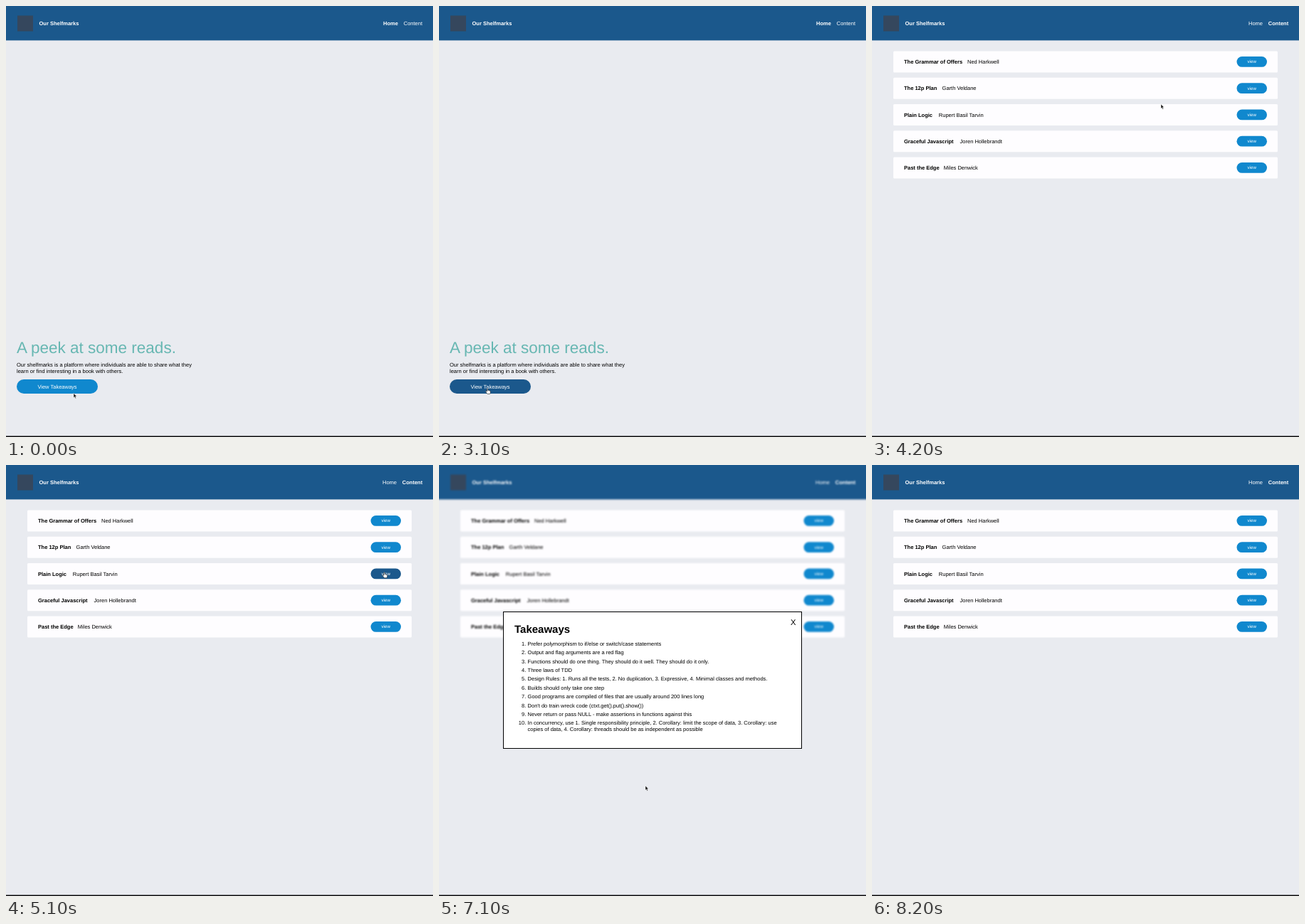
Recreate the animation shown at these times as an HTML page. Size 600 by 606 pixels, loop 9300 ms.

```html
<!DOCTYPE html>
<html lang="en">
<head>
<meta charset="utf-8">
<title>Our Shelfmarks</title>
<style>
  html, body { margin: 0; width: 100%; height: 100%; overflow: hidden; background: #e9ebf0; }
  svg { display: block; width: 100vw; height: 100vh; }
  text {
    font-family: "Liberation Sans", Arial, sans-serif;
    font-size: 7.5px;
    text-rendering: geometricPrecision;
    white-space: pre;
  }
  .bold { font-weight: 700; }
  .light { fill: #fff; }
  .mid { text-anchor: middle; }
  .end { text-anchor: end; }
  .small { font-size: 6.25px; }
</style>
</head>
<body>
<svg id="stage" viewBox="0 0 600 606">
  <rect width="600" height="606" fill="#e9ebf0"/>
  <g id="app">
    <rect x="-10" y="-10" width="620" height="58.4" fill="#1b588c"/>
    <rect x="16" y="13.5" width="22" height="22" fill="#35475d"/>
    <text class="bold light" x="46.5" y="27">Our Shelfmarks</text>
    <g id="home">
      <text class="bold light" x="530" y="27">Home</text>
      <text class="light end" x="585" y="27">Content</text>
      <text x="15" y="488" style="font-size:22.5px" fill="#67b7b2">A peek at some reads.</text>
      <text x="15" y="507.3">Our shelfmarks is a platform where individuals are able to share what they</text>
      <text x="15" y="515.9">learn or find interesting in a book with others.</text>
      <rect id="cta" x="15" y="525" width="114" height="20" rx="10"/>
      <text class="light mid" x="72" y="537.6">View Takeaways</text>
    </g>
    <g id="content">
      <text class="light" x="529" y="27">Home</text>
      <text class="bold light end" x="585.2" y="27">Content</text>
    </g>
  </g>
  <g id="modal">
    <rect x="90.5" y="206.5" width="419" height="192" fill="#fff" stroke="#000"/>
    <text class="bold" x="106" y="235.6" style="font-size:15px">Takeaways</text>
    <text class="mid" x="497.8" y="225" style="font-size:11.25px">X</text>
  </g>
  <rect y="604.5" width="600" height="1.5" fill="#0a0a0c"/>
  <path id="arrow" d="M0 0V6.2L1.4 5L2.4 7.2L3.5 6.7L2.5 4.6H4.4Z"
        fill="#111" stroke="#fff" stroke-width=".5"/>
  <path id="hand" d="M2.1 4.6V1Q2.1 .2 2.7 .2T3.4 1V3.1Q4.2 2.6 4.6 3.2Q5.4 2.8 5.8 3.5Q6.9 3.3 6.9 4.4
        V5.9Q6.8 7 6.1 8H2.8Q1.7 6.7 .4 5Q.1 4.1 1 4Z"
        fill="#fff" stroke="#222" stroke-width=".6"/>
</svg>
<script>
const LOOP = 9300, STEP = 100;
const BLUE = [16, 136, 206], DARK = [27, 88, 140];
const $ = id => document.getElementById(id);

function add(parent, tag, attrs, text = '') {
  const el = document.createElementNS('http://www.w3.org/2000/svg', tag);
  for (const k in attrs) el.setAttribute(k, attrs[k]);
  el.textContent = text;
  return parent.appendChild(el);
}

const books = [
  ['The Grammar of Offers', 'Ned Harkwell', 134],
  ['The 12p Plan', 'Garth Veldane', 98.6],
  ['Plain Logic', 'Rupert Basil Tarvin', 93.8],
  ['Graceful Javascript', 'Joren Hollebrandt', 123.6],
  ['Past the Edge', 'Miles Denwick', 100.8]
];

const viewButtons = books.map(([title, author, x], i) => {
  const card = add($('content'), 'g', { transform: `translate(0 ${63.5 + i * 37.25})` });
  add(card, 'rect', { x: 30, width: 540, height: 30, rx: 1.5, fill: '#fefdff' });
  add(card, 'text', { class: 'bold', x: 45, y: 17.5 }, title);
  add(card, 'text', { x, y: 17.5 }, author);
  const button = add(card, 'rect', { x: 512.5, y: 7.5, width: 42.5, height: 14.8, rx: 7.4 });
  add(card, 'text', { class: 'light mid small', x: 533.7, y: 16.8 }, 'view');
  return button;
});

const notes = [
  'Prefer polymorphism to if/else or switch/case statements',
  'Output and flag arguments are a red flag',
  'Functions should do one thing. They should do it well. They should do it only.',
  'Three laws of TDD',
  'Design Rules: 1. Runs all the tests, 2. No duplication, 3. Expressive, 4. Minimal classes and methods.',
  'Builds should only take one step',
  'Good programs are compiled of files that are usually around 200 lines long',
  "Don't do train wreck code (ctxt.get().put().show())",
  'Never return or pass NULL - make assertions in functions against this',
  'In concurrency, use 1. Single responsibility principle, 2. Corollary: limit the scope of data, 3. Corollary: use\n'
    + 'copies of data, 4. Corollary: threads should be independent as possible'.replace('be independent', 'be as independent')
];

notes.forEach((note, i) => {
  const y = 253.8 + i * 12.4;
  add($('modal'), 'text', { class: 'end', x: 122.3, y }, `${i + 1}.`);
  note.split('\n').forEach((line, j) =>
    add($('modal'), 'text', { x: 124.6, y: y + j * 8.6 }, line));
});

// Pointer tip: time, x, y
const path = [
  [0, 95, 544.5], [600, 95, 544.5], [1600, 107.5, 531.5],
  [1900, 107.5, 531.5], [2700, 68, 537.5],
  [3300, 68, 537.5], [4100, 402, 130], [4300, 410, 146],
  [4400, 410, 146], [4600, 462, 180], [4900, 531, 152],
  [5000, 531, 152], [5100, 531.5, 150.7],
  [6600, 531.5, 150.7], [7100, 290, 451],
  [7900, 290, 451], [8200, 610, 451], [LOOP, 610, 451]
];

const clamp = v => Math.min(1, Math.max(0, v));
const ease = v => v * v * (3 - 2 * v);
const mix = (a, b, k) => a + (b - a) * k;
const shade = k => `rgb(${BLUE.map((c, i) => Math.round(mix(c, DARK[i], k)))})`;
const show = (id, on) => $(id).setAttribute('visibility', on ? 'visible' : 'hidden');

function pointer(t) {
  const i = path.findIndex(p => p[0] > t);
  const [t0, x0, y0] = path[i - 1], [t1, x1, y1] = path[i];
  const k = ease((t - t0) / (t1 - t0));
  return [mix(x0, x1, k), mix(y0, y1, k)];
}

function render(time) {
  const t = Math.floor((time % LOOP) / STEP) * STEP;
  const onHome = t < 3200;
  const open = t >= 5700 && t < 7900;

  show('home', onHome);
  show('content', !onHome);
  show('modal', open);
  $('app').style.filter = open ? 'blur(.9px)' : 'none';

  $('cta').setAttribute('fill', shade(clamp((t - 1600) / 200)));
  viewButtons.forEach((b, i) =>
    b.setAttribute('fill', shade(i === 2 && t >= 4900 && t < 5700 ? 1 : 0)));

  const [x, y] = pointer(t);
  const hand = (t >= 1400 && t < 3500) || (t >= 4900 && t < 5700);
  show('hand', hand);
  show('arrow', !hand);
  $('hand').setAttribute('transform', `translate(${x - 2.7} ${y})`);
  $('arrow').setAttribute('transform', `translate(${x} ${y})`);
}

const start = performance.now();
function tick() {
  render(performance.now() - start);
  requestAnimationFrame(tick);
}
tick();
</script>
</body>
</html>
```
